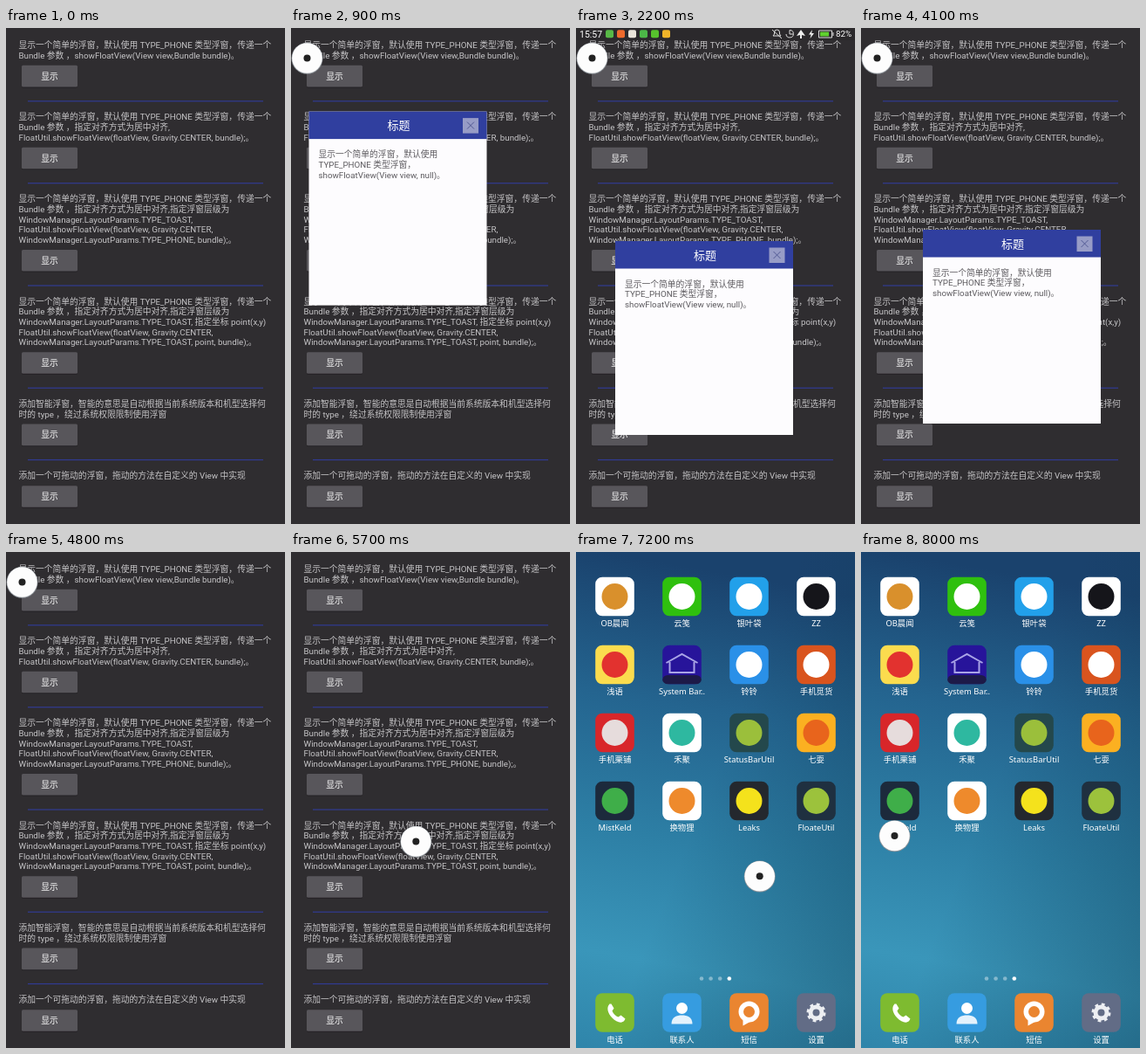
Write an HTML page that moves like this. It is 320 px wide and 568 px high and loops after 8.1 s.

```html
<!DOCTYPE html>
<html lang="zh-CN">
<head>
<meta charset="utf-8">
<title>浮窗</title>
<style>
html, body { margin: 0; width: 100%; height: 100%; overflow: hidden; background: #2f2d30; }
svg { display: block; width: 100vw; height: 100vh; }
text { font: 9.78px Roboto, "Noto Sans CJK SC", "Noto Sans CJK", sans-serif; white-space: pre; }
.app text { font: 9.4px "Noto Sans", "Noto Sans CJK SC", "Noto Sans CJK", sans-serif; }
</style>
</head>
<body>
<svg id="stage" viewBox="0 0 320 568" preserveAspectRatio="none">
  <defs>
    <linearGradient id="sky" x1=".1" y1="0" x2="0" y2="1">
      <stop offset="0" stop-color="#1a426d"/>
      <stop offset=".28" stop-color="#24648f"/>
      <stop offset=".55" stop-color="#2d7fa5"/>
      <stop offset=".8" stop-color="#3a96ba"/>
      <stop offset="1" stop-color="#2f85aa"/>
    </linearGradient>
    <linearGradient id="shade" x1="0" y1=".3" x2="1" y2="1">
      <stop offset=".4" stop-color="#0d3a50" stop-opacity="0"/>
      <stop offset="1" stop-color="#0d3a50" stop-opacity=".4"/>
    </linearGradient>
  </defs>
</svg>
<script>
const LOOP = 8100, STEP = 100;
const stage = document.getElementById('stage');

function add(parent, tag, attrs = {}, text) {
  const e = document.createElementNS('http://www.w3.org/2000/svg', tag);
  for (const k in attrs) e.setAttribute(k, attrs[k]);
  if (text) e.textContent = text;
  parent.appendChild(e);
  return e;
}
const group = (attrs = {}) => add(stage, 'g', attrs);
const rect = (p, x, y, width, height, fill, rx = 0) => add(p, 'rect', { x, y, width, height, fill, rx });
const disc = (p, cx, cy, r, fill) => add(p, 'circle', { cx, cy, r, fill });
const path = (p, d, fill = 'none', stroke = 'none', w = 1) =>
  add(p, 'path', { d, fill, stroke, 'stroke-width': w });
function label(p, x, mid, str, fill, anchor = 'start', size = 0) {
  const t = add(p, 'text', { x, y: mid + (size || 10) * .36, fill, 'text-anchor': anchor }, str);
  if (size) t.style.fontSize = size + 'px';
  return t;
}

// Home screen
const home = group({ class: 'app' });
rect(home, 0, 0, 320, 568, 'url(#sky)');
rect(home, 0, 0, 320, 568, 'url(#shade)');

function app(i, y, name, back) {
  const x = 44.5 + (i % 4) * 77;
  const g = add(home, 'g', { transform: `translate(${x} ${y})` });
  rect(g, -22.3, -22.3, 44.6, 44.6, back, 8);
  label(g, 0, 30.5, name, '#fff', 'middle');
  return g;
}

// label, tile colour, disc colour
const apps = [
  ['OB晨闻', '#fff', '#d9902c'], ['云笺', '#2fc00e', '#fff'],
  ['银叶袋', '#22a0ea', '#fff'], ['ZZ', '#fff', '#15151a'],
  ['浅语', '#fbdc4e', '#e2322f'], ['System Bar..', '#27149a'],
  ['铃铃', '#2a90e8', '#fff'], ['手机觅货', '#d9541e', '#fff'],
  ['手机栗铺', '#d8262a', '#e6dcdc'], ['禾聚', '#fff', '#2eb8a0'],
  ['StatusBarUtil', '#24484c', '#9bbf3b'], ['七耍', '#fbb021', '#e8641c'],
  ['MistKeld', '#1c2a3c', '#3fae49'], ['换物狸', '#fff', '#ee8a2c'],
  ['Leaks', '#24282e', '#f4e21c'], ['FloateUtil', '#1f3040', '#9cc23c']
];
apps.forEach(([name, back, mark], i) => {
  const g = app(i, 51 + Math.floor(i / 4) * 78, name, back);
  if (mark) return disc(g, 0, 0, 15, mark);
  rect(g, -22.3, 12, 44.6, 10.3, '#1d1a48', 6);
  path(g, 'M-18 -2L0 -12L18 -2M-14 -3V9H14V-3', 'none', '#a9a4e6', 2);
});
for (let i = 0; i < 4; i++) disc(home, 144 + i * 10.6, 488.5, 2.3, i === 3 ? '#fff' : 'rgba(255,255,255,.4)');

const phone = app(0, 527.5, '电话', '#7ebb30');
path(phone, 'M-6 -10C-10 -6 -8 1 -3 6C2 11 8 13 11 9L12 7L7 3L4 5C1 4 -2 1 -3 -2L-1 -5L-4 -10Z', '#fff');
const people = app(1, 527.5, '联系人', '#369ce0');
disc(people, 0, -5, 6.5, '#fff');
path(people, 'M-12 13C-12 5 -6 3 0 3S12 5 12 13Z', '#e4f2fc');
const message = app(2, 527.5, '短信', '#ea8530');
disc(message, 0, -1, 12, '#fff');
path(message, 'M-7 8V15L2 10Z', '#fff');
disc(message, 0, -1, 6.5, '#ea8530');
const settings = app(3, 527.5, '设置', '#626c86');
add(settings, 'circle', { r: 9, fill: 'none', stroke: '#eceef2', 'stroke-width': 4, 'stroke-dasharray': '3.534' });
disc(settings, 0, 0, 9, '#eceef2');
disc(settings, 0, 0, 4, '#626c86');

// Demo list
const list = group();
rect(list, 0, 0, 320, 568, '#2f2d30');
const intro = '显示一个简单的浮窗，默认使用 TYPE_PHONE 类型浮窗，传递一个';
const layered = 'Bundle 参数 ，指定对齐方式为居中对齐,指定浮窗层级为';
const call = 'FloatUtil.showFloatView(floatView, Gravity.CENTER,';
const params = 'WindowManager.LayoutParams.';
const items = [
  [intro, 'Bundle 参数 ，showFloatView(View view,Bundle bundle)。'],
  [intro, 'Bundle 参数 ，指定对齐方式为居中对齐,', call + ' bundle);。'],
  [intro, layered, params + 'TYPE_TOAST,', call, params + 'TYPE_PHONE, bundle);。'],
  [intro, layered, params + 'TYPE_TOAST, 指定坐标 point(x,y)', call, params + 'TYPE_TOAST, point, bundle);。'],
  ['添加智能浮窗，智能的意思是自动根据当前系统版本和机型选择何', '时的 type ，绕过系统权限限制使用浮窗'],
  ['添加一个可拖动的浮窗，拖动的方法在自定义的 View 中实现']
];
let y = 19.5;
const buttons = items.map((lines, i) => {
  for (const s of lines) {
    label(list, 14.5, y, s, '#c6c5c7');
    y += 11.65;
  }
  rect(list, 18, y + 1, 64, 24.6, '#232124', 1.5);
  const b = rect(list, 18, y, 64, 24.6, '#58565b', 1.5);
  label(list, 50, y + 12.3, '显示', '#fff', 'middle');
  if (i < items.length - 1) rect(list, 25, y + 40.4, 270, 1.2, '#303a92');
  y += 59;
  return b;
});

// Status bar
const bar = group();
rect(bar, 0, 0, 320, 14, '#2b292c');
label(bar, 4, 6.8, '15:57', '#fff', 'start', 10.5);
['#58b947', '#ee6a2c', '#e9e4da', '#4cb848', '#57c22d', '#f0b429'].forEach((c, i) =>
  rect(bar, 34 + i * 13, 2.3, 9, 9, c, 2));
path(bar, 'M226 9H235L233.5 7V5A3 3 0 0 0 227.5 5V7ZM225 2L236 12', 'none', '#ddd');
path(bar, 'M241 7A4.2 4.2 0 1 0 245 2.5V7H249', 'none', '#ddd');
path(bar, 'M258 2L263 9L259 8V12H257V8L253 9Z', '#eee');
path(bar, 'M271 2L267 7.5H269.6L268.5 12L273 6H270.2Z', '#eee');
path(bar, 'M278.5 3H293.5V11H278.5ZM295 5V9', 'none', '#ddd');
rect(bar, 280, 4.5, 10, 5, '#5fd02f');
label(bar, 298, 6.8, '82%', '#fff');

// Floating dialog
const dialog = group();
rect(dialog, 0, 0, 204, 222, '#fdfcfe');
rect(dialog, 0, 0, 204, 31.5, '#303f9f');
label(dialog, 103, 16, '标题', '#fff', 'middle', 13);
const closer = rect(dialog, 176.5, 7.5, 18, 17.5, '#979cc6');
path(dialog, 'M181.5 12L189.5 20M189.5 12L181.5 20', 'none', '#535a94');
['显示一个简单的浮窗，默认使用', 'TYPE_PHONE 类型浮窗，', 'showFloatView(View view, null)。'].forEach((s, n) =>
  label(dialog, 11, 49 + n * 11.8, s, '#5c5a5e'));

// Floating ball
const ball = group();
disc(ball, 0, .3, 18, '#8d9399');
disc(ball, 0, 0, 17.3, '#fdfdfd');
disc(ball, 0, 0, 4, '#222');

// Drag stops: [ms, x, y]
const dialogDrag = [
  [600, 0, 0], [1300, 52, 243], [1700, 14, 129], [2200, 45, 244],
  [2500, 88, 334], [3100, 58, 150], [3700, 71, 231]
];
const ballDrag = [
  [4800, 18.5, 34.5], [5200, 170, 286], [5500, 244, 250], [5800, 108, 360], [5900, 131, 381],
  [6900, 131, 381], [7400, 254, 366], [7600, 214, 440], [7900, 40, 375], [8000, 38.5, 325]
];

const clamp = v => Math.min(1, Math.max(0, v));
const smooth = k => k * k * (3 - 2 * k);
function at(stops, t) {
  let [, x, y] = stops[0];
  for (let i = 1; i < stops.length; i++) {
    const [from] = stops[i - 1], [to, nx, ny] = stops[i];
    const k = smooth(clamp((t - from) / (to - from)));
    x += (nx - x) * k;
    y += (ny - y) * k;
  }
  return [x, y];
}
const show = (e, on) => e.setAttribute('visibility', on ? 'visible' : 'hidden');
const move = (e, x, y) => e.setAttribute('transform', `translate(${x.toFixed(1)} ${y.toFixed(1)})`);
const press = (b, on) => b.setAttribute('fill', on ? '#77757a' : '#58565b');

function draw(t) {
  const leave = clamp((t - 6500) / 500);
  move(list, 0, 568 * (1 - (1 - leave) ** 1.45));
  list.setAttribute('opacity', 1 - leave / 2);
  press(buttons[5], t >= 100 && t < 300);
  press(buttons[0], t >= 400 && t < 600);
  show(bar, t >= 1000 && t < 3900);
  show(dialog, t >= 600 && t < 4400);
  move(dialog, ...at(dialogDrag, t));
  closer.setAttribute('fill', t >= 4200 ? '#b4b8d8' : '#979cc6');
  show(ball, t >= 300);
  move(ball, ...at(ballDrag, t));
}

const start = performance.now();
function tick() {
  const t = (performance.now() - start) % LOOP;
  draw(Math.floor(t / STEP) * STEP);
  requestAnimationFrame(tick);
}
draw(0);
requestAnimationFrame(tick);
</script>
</body>
</html>
```
